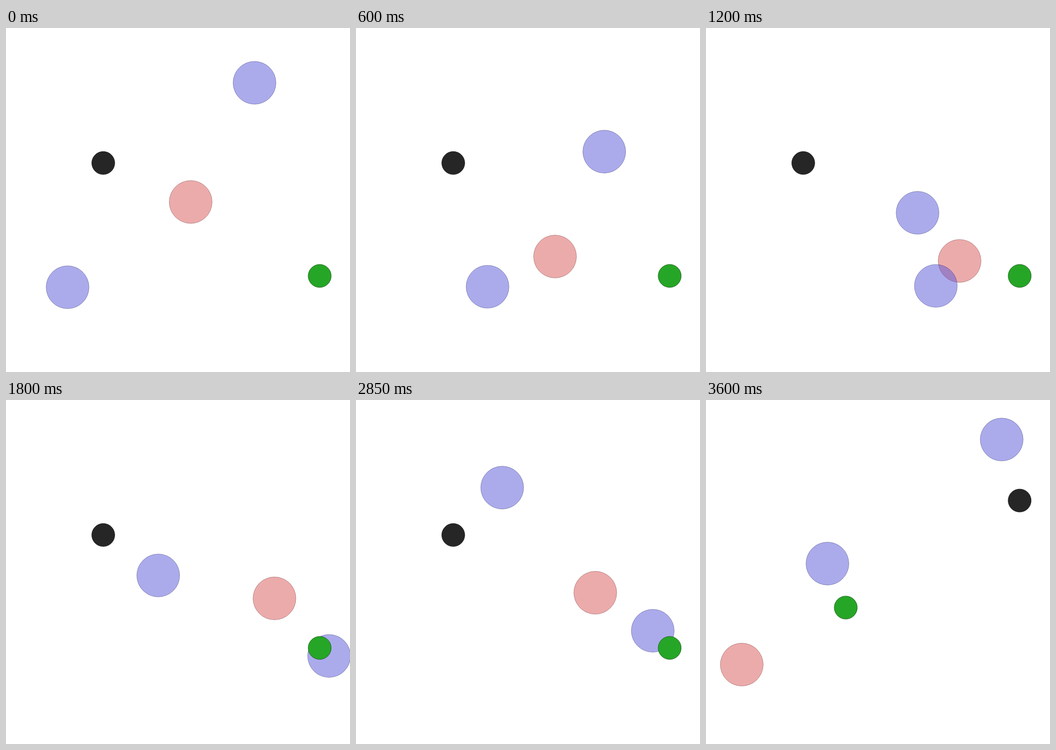
Recreate the animation shown at these times as an HTML page. Size 700x700 px, loop 3750 ms.

```html
<!DOCTYPE html>
<html lang="en">
<head>
<meta charset="utf-8">
<title>Pursuit</title>
<style>
  html, body { margin: 0; width: 100%; height: 100%; overflow: hidden; background: #fff; }
  svg { display: block; width: 100vw; height: 100vh; }
  .agent { fill-opacity: .5; stroke-opacity: .45; }
  .mark { stroke-opacity: .85; }
  .red { fill: #d95959; stroke: #6c2c2c; }
  .blue { fill: #5959d9; stroke: #2c2c6c; }
  .dark { fill: #262626; stroke: #131313; }
  .green { fill: #26a626; stroke: #135313; }
</style>
</head>
<body>
<svg viewBox="0 0 700 700">
  <circle id="dark" class="mark dark" r="23.4"/>
  <circle id="red" class="agent red" r="43.6"/>
  <circle id="runner" class="agent blue" r="43.6"/>
  <circle id="diver" class="agent blue" r="43.6"/>
  <circle id="green" class="mark green" r="23.4"/>
</svg>
<script>
const STEP = 150;
const STEPS = 25;
const KEEP = 0.75; // share of the velocity that survives each step

// push: velocity at the start; stops: [step, x, y] to steer through;
// reset: place in the fresh layout of the last step.
const bodies = {
  dark: { push: [0, 0], stops: [[0, 197.9, 274.7]], reset: [638.2, 204.6] },
  green: { push: [0, 0], stops: [[0, 638.3, 504.5]], reset: [284.4, 422.4] },
  red: {
    push: [0, 8],
    stops: [[0, 375.8, 354], [4, 405, 465], [8, 516, 474], [12, 546.3, 403.7],
      [16, 515.6, 381.5], [22, 457.8, 410.5], [23, 451, 416]],
    reset: [72.8, 538.4]
  },
  runner: {
    push: [13, 0],
    stops: [[0, 125.3, 527.5], [4, 267.7, 526.5], [11, 628.5, 523.3], [16, 625.7, 499.3],
      [18, 599, 480.5], [20, 620.5, 458], [22, 643.3, 446.2], [23, 645.5, 442]],
    reset: [247.1, 332.9]
  },
  diver: {
    push: [0, 14],
    stops: [[0, 505.7, 111.5], [5, 505, 298.5], [8, 430.5, 376], [10, 359.5, 386.3],
      [14, 278.5, 300.5], [16, 283.4, 255.1], [18, 291.5, 199.5], [20, 305.5, 163.5],
      [22, 308.3, 172.6], [23, 310, 168.7]],
    reset: [601.7, 80.4]
  }
};

// Constant thrust that covers a distance in n steps under drag.
function thrust(distance, velocity, n) {
  const coast = KEEP * (1 - KEEP ** n) / (1 - KEEP);
  return (distance - velocity * coast) * (1 - KEEP) / (n - coast);
}

// Positions on one axis at every step, steering from stop to stop.
function travel({ push, stops }, axis) {
  let velocity = push[axis];
  let place = stops[0][axis + 1];
  const track = [place];
  for (let i = 1; i < stops.length; i++) {
    const n = stops[i][0] - stops[i - 1][0];
    const force = thrust(stops[i][axis + 1] - place, velocity, n);
    for (let k = 0; k < n; k++) {
      velocity = velocity * KEEP + force;
      track.push(place += velocity);
    }
  }
  return track;
}

const actors = Object.entries(bodies).map(([id, body]) => ({
  dot: document.getElementById(id),
  tracks: [travel(body, 0), travel(body, 1)],
  reset: body.reset
}));

function draw(step) {
  for (const { dot, tracks, reset } of actors) {
    const [x, y] = step === STEPS - 1
      ? reset
      : tracks.map(track => track[Math.min(step, track.length - 1)]);
    dot.setAttribute("cx", x);
    dot.setAttribute("cy", y);
  }
}

const start = performance.now();
let shown = -1;

function tick() {
  const step = Math.floor((performance.now() - start) / STEP) % STEPS;
  if (step !== shown) draw(shown = step);
  requestAnimationFrame(tick);
}
tick();
</script>
</body>
</html>
```
